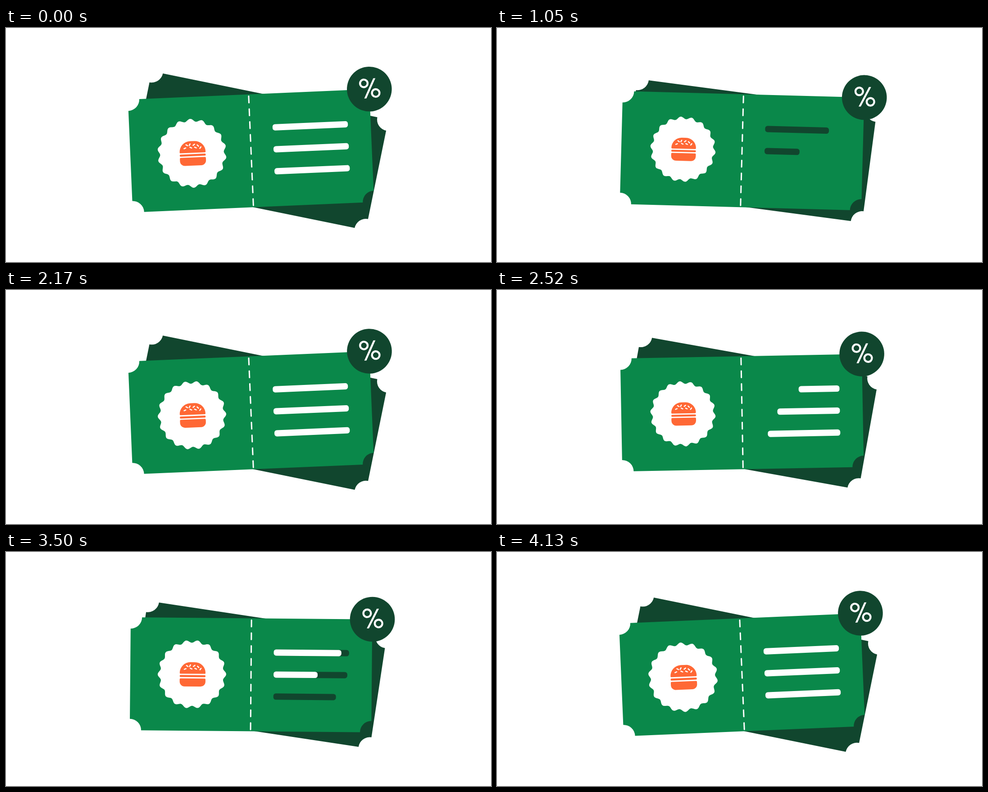
Animation of 1077x520 px, one loop 4.2 s. Source, as an HTML page with a canvas:

```html
<!DOCTYPE html>
<html lang="en">
<head>
<meta charset="utf-8">
<title>Coupon</title>
<style>
html, body { margin: 0; width: 100%; height: 100%; overflow: hidden; background: #fff; }
canvas { display: block; width: 1077px; height: 520px; }
</style>
</head>
<body>
<canvas id="stage"></canvas>
<script>
const W = 1077, H = 520, LOOP = 4200, HALF = LOOP / 2, STEP = 70;
const GREEN = '#0a884a', DARK = '#11462e', ORANGE = '#ff6835', WHITE = '#fff';
const RAD = Math.PI / 180;

const canvas = document.getElementById('stage');
const ctx = canvas.getContext('2d');
const ratio = window.devicePixelRatio || 1;
canvas.width = W * ratio;
canvas.height = H * ratio;

const clamp = x => Math.min(1, Math.max(0, x));
const smooth = x => x * x * (3 - 2 * x);
const easeOut = x => 1 - (1 - clamp(x)) ** 3;
const easeIn = x => clamp(x) ** 3;

// Eased swing 0 -> 1 -> 0 over half a loop
function swing(t) {
  const x = ((t % HALF) + HALF) % HALF / HALF;
  return smooth(1 - Math.abs(2 * x - 1));
}

function group(x, y, angle, scale, draw) {
  ctx.save();
  ctx.translate(x, y);
  ctx.rotate(angle * RAD);
  ctx.scale(scale, scale);
  draw();
  ctx.restore();
}

function box(x, y, w, h, radii, color) {
  ctx.fillStyle = color;
  ctx.beginPath();
  ctx.roundRect(x, y, w, h, radii);
  ctx.fill();
}

function disc(x, y, r, color) {
  ctx.fillStyle = color;
  ctx.beginPath();
  ctx.arc(x, y, r, 0, 2 * Math.PI);
  ctx.fill();
}

// Rectangle with a concave quarter circle at each corner
function ticket(color) {
  const w = 268.2, h = 125.5, n = 25.2, q = Math.PI / 2;
  ctx.fillStyle = color;
  ctx.beginPath();
  ctx.arc(-w, -h, n, q, 0, true);
  ctx.arc(w, -h, n, 2 * q, q, true);
  ctx.arc(w, h, n, 3 * q, 2 * q, true);
  ctx.arc(-w, h, n, 0, 3 * q, true);
  ctx.closePath();
  ctx.fill();
}

function perforation() {
  ctx.strokeStyle = WHITE;
  ctx.lineWidth = 3;
  ctx.lineCap = 'round';
  ctx.beginPath();
  for (let i = 0; i < 9; i++) {
    const y = -121.4 + i * 28.55;
    ctx.moveTo(0, y);
    ctx.lineTo(0, y + 14.6);
  }
  ctx.stroke();
}

function scallop() {
  ctx.fillStyle = WHITE;
  ctx.beginPath();
  for (let a = 0; a < 360; a++) {
    const r = 74.5 + 3 * Math.cos(18 * a * RAD);
    ctx.lineTo(r * Math.sin(a * RAD), -r * Math.cos(a * RAD));
  }
  ctx.closePath();
  ctx.fill();
}

// x, y, angle
const SEEDS = [
  [-17, -12, -22], [-12.4, -18.8, 32], [-6, -19.6, -60], [-3.6, -13, 24],
  [3.4, -19.2, -36], [6.8, -12.8, 24], [12.4, -17, 45], [17.8, -12.2, -52]
];

function burger() {
  box(-29.2, -27.5, 58.4, 26.2, [25, 25, 2, 2], ORANGE);
  box(-29.2, 1.7, 58.4, 4.5, 2, ORANGE);
  box(-29.2, 9.2, 58.4, 18.3, [2, 2, 11, 11], ORANGE);
  for (const [x, y, a] of SEEDS) {
    group(x, y, a, 1, () => box(-3.3, -1.3, 6.6, 2.6, 1.3, WHITE));
  }
}

function percent() {
  ctx.strokeStyle = WHITE;
  ctx.lineWidth = 4.4;
  for (const [x, y] of [[-11.7, -13.2], [13.8, 9.3]]) {
    ctx.beginPath();
    ctx.arc(x, y, 8.4, 0, 2 * Math.PI);
    ctx.stroke();
  }
  ctx.fillStyle = WHITE;
  ctx.beginPath();
  ctx.moveTo(9.6, -23.6);
  ctx.lineTo(14.4, -23.6);
  ctx.lineTo(-7.4, 20.4);
  ctx.lineTo(-12.2, 20.4);
  ctx.closePath();
  ctx.fill();
}

function bar(y, from, to, color) {
  const w = (to - from) * 167.4;
  if (w > 1) box(50 + from * 167.4, y - 7, w, 14, Math.min(5.5, w / 2), color);
}

function bars(t) {
  for (let i = 0; i < 3; i++) {
    const y = -49.8 + 48.9 * i;
    const wiped = easeIn((t - 118 * i) / 545);
    const dark = easeOut((t - 746 - 181 * i) / 654);
    const white = easeOut((t - 1052 - 182 * i) / 654);
    bar(y, wiped, 1, WHITE);
    if (white < 1) bar(y, 0, dark, DARK);
    bar(y, 0, white, WHITE);
  }
}

function draw(t) {
  const tilt = 4 * swing(t);
  const pulse = 0.916 + 0.0935 * swing(t - 735);
  ctx.setTransform(ratio, 0, 0, ratio, 0, 0);
  ctx.fillStyle = WHITE;
  ctx.fillRect(0, 0, W, H);

  group(561.3, 272.6, 11.55 - tilt, 1, () => ticket(DARK));
  group(544.1, 272.8, -2.47 + tilt, 1, () => {
    ticket(GREEN);
    perforation();
    group(-131.2, 0, -0.6 + 60 * t / LOOP, pulse, scallop);
    group(-129.7, 0.2, 0, pulse, burger);
    bars(t % HALF);
    group(268.4, -125.6, 0, 1, () => {
      disc(0, 0, 49.8, DARK);
      percent();
    });
  });
}

const start = performance.now();
function frame() {
  const t = (performance.now() - start) % LOOP;
  draw(Math.floor(t / STEP) * STEP);
  requestAnimationFrame(frame);
}
draw(0);
requestAnimationFrame(frame);
</script>
</body>
</html>
```
